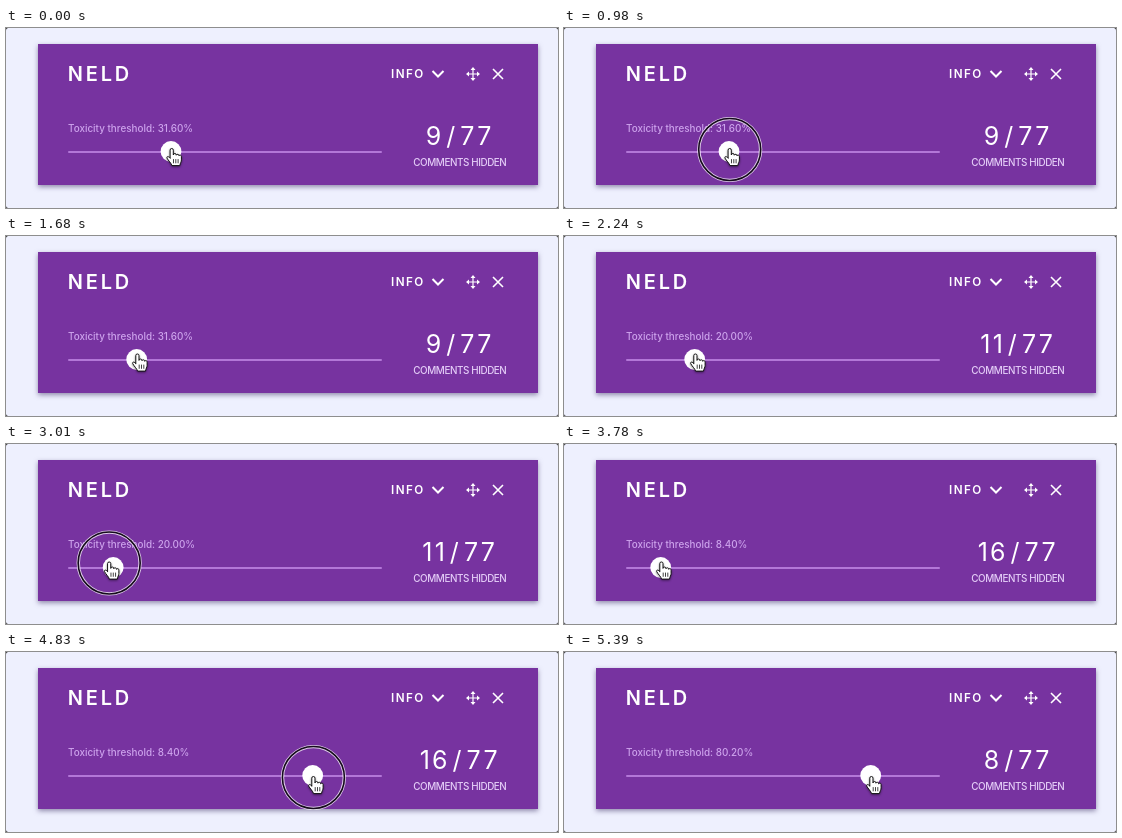
An HTML page for the animation above (6.02 s loop, 552 px wide and 180 px high).

```html
<!DOCTYPE html>
<html lang="en">
<head>
<meta charset="utf-8">
<title>Toxicity threshold slider</title>
<style>
  html, body { margin: 0; width: 100%; height: 100%; overflow: hidden; background: #333; }
  svg { display: block; width: 552px; height: 180px; font-family: Inter, "Open Sans", sans-serif; }
  .panel { filter: drop-shadow(0 2px 2.5px rgba(50, 35, 90, .5)); }
  .line { fill: none; stroke: #fff; stroke-width: 1.6; }
  .pointer { filter: drop-shadow(0 1px .8px rgba(0, 0, 0, .45)); }
  .label { font-size: 9.9px; font-weight: 500; }
</style>
</head>
<body>
<svg viewBox="0 0 552 180">
  <rect width="552" height="180" rx="2.5" fill="#eef0fe"/>
  <rect class="panel" x="32" y="16" width="500" height="141" fill="#7733a0"/>

  <g fill="#fff">
    <text x="61.8" y="53" font-size="20" font-weight="600" letter-spacing="2.8">NELD</text>
    <text x="385" y="50" font-size="11.7" font-weight="600" letter-spacing="1.4">INFO</text>
    <text x="453.7" y="117" font-size="25" font-weight="400" letter-spacing="2.2" text-anchor="middle"><tspan id="count"></tspan><tspan dx="2.8">/</tspan><tspan dx="2.8">77</tspan></text>
  </g>
  <path class="line" d="M426.5 43 432 48.5 437.5 43" style="stroke-width:2"/>
  <path class="line" d="M487 41 497 51M497 41 487 51"/>
  <g transform="translate(467 46)">
    <path class="line" d="M-6 0H6M0-6V6" style="stroke-width:1.2"/>
    <path fill="#fff" d="M0-7 2.5-4H-2.5ZM0 7 2.5 4H-2.5ZM-7 0-4-2.5V2.5ZM7 0 4-2.5V2.5Z"/>
  </g>

  <text id="label" class="label" x="62" y="104" fill="#cda3ec"></text>
  <text class="label" x="407.3" y="138" fill="#e4cdf7" letter-spacing="-.42">COMMENTS HIDDEN</text>

  <rect x="62" y="123" width="314" height="2" rx="1" fill="#b377d8"/>
  <circle id="knob" cy="123.5" r="10.4" fill="#fff"/>
  <g id="cursor">
    <g id="ring" fill="none">
      <circle r="30.9" stroke="#fff" stroke-opacity=".75" stroke-width="3.4"/>
      <circle r="31" stroke="#150a1c" stroke-width="1.6"/>
    </g>
    <g class="pointer" transform="translate(0 .4)" stroke="#111" stroke-linejoin="round" stroke-linecap="round">
      <path fill="#fff" d="M-1.6 8V.2a1.6 1.6 0 0 1 3.2 0V5a1.5 1.5 0 0 1 3 .3a1.4 1.4 0 0 1 2.7.6a1.3 1.3 0 0 1 2.4.9V10c0 2-1.2 3-1.6 5.7H.2C-.4 13.3-3.5 10.6-4.7 8.2C-5.2 6.4-3.4 6-1.6 8Z"/>
      <path fill="none" stroke-width=".8" d="M1.8 9.6V13M4.1 9.6V13M6.4 9.6V13"/>
    </g>
  </g>
</svg>
<script>
  const LOOP = 6020, STEP = 70;
  const $ = id => document.getElementById(id);
  const clamp = p => Math.min(1, Math.max(0, p));
  const smooth = p => p * p * (3 - 2 * p);
  const cubic = p => p < .5 ? 4 * p ** 3 : 1 - 4 * (1 - p) ** 3;
  const lastBefore = (list, t) => list.filter(item => item[0] <= t).pop()[1];

  // Each drag: button held from press to release, movement from start to end.
  const drags = [
    { press: 980, release: 1680, start: 1120, end: 1610, dx: -34.3, dy: -2.5, lag: 38, ease: smooth },
    { press: 2660, release: 3220, start: 2700, end: 3120, dx: -34, dy: 0, lag: 45, ease: smooth },
    { press: 4130, release: 4900, start: 4270, end: 4830, dx: 210, dy: 6.5, lag: 15, ease: cubic }
  ];
  const levels = [[0, '31.60'], [1750, '20.00'], [3290, '8.40'], [4970, '80.20']];
  const counts = [[0, 9], [1750, 10], [1820, 11], [3360, 16], [5040, 10], [5250, 8]];

  const travel = (t, axis, lagged) => drags.reduce((sum, d) =>
    sum + d[axis] * d.ease(clamp((t - d.start - (lagged ? d.lag : 0)) / (d.end - d.start))), 0);

  function draw(t) {
    const x = 165.7 + travel(t, 'dx'), y = 121.5 + travel(t, 'dy');
    const held = drags.some(d => t >= d.press && t < d.release);
    $('knob').setAttribute('cx', 165 + travel(t, 'dx', true));
    $('cursor').setAttribute('transform', `translate(${x} ${y})`);
    $('ring').setAttribute('visibility', held ? 'visible' : 'hidden');
    $('label').textContent = `Toxicity threshold: ${lastBefore(levels, t)}%`;
    $('count').textContent = lastBefore(counts, t);
  }

  const origin = performance.now();
  function tick() {
    const t = (performance.now() - origin) % LOOP;
    draw(Math.floor(t / STEP) * STEP);
    requestAnimationFrame(tick);
  }
  tick();
</script>
</body>
</html>
```
